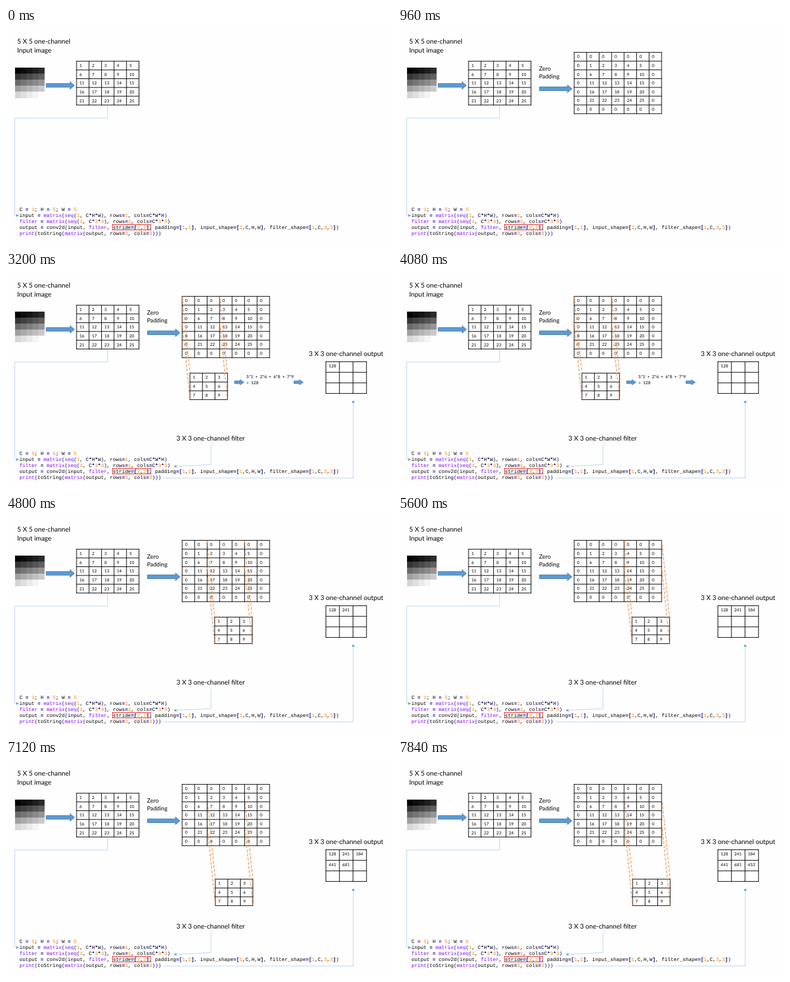
Write an HTML page that moves like this. It is 640 px wide and 360 px high and loops after 8 s.

```html
<!DOCTYPE html>
<html lang="en">
<head>
<meta charset="utf-8">
<title>Convolution with padding and stride</title>
<style>
  html, body { margin: 0; width: 100%; height: 100%; overflow: hidden; background: #fefefe; }
  svg { display: block; width: 640px; height: 360px; text-rendering: geometricPrecision; }
  text { font-family: Lato, "Open Sans", sans-serif; fill: #000; white-space: pre; }
  .title { font-size: 11px; }
  .note { font-size: 9.7px; }
  .cell { font-size: 7px; }
  .sum { font-size: 7.2px; word-spacing: 1.6px; }
  .code { font: 8.333px "Liberation Mono", monospace; }
  .num { fill: #ff8000; }
  .fn { fill: #8000ff; }
  .paren { fill: #000080; }
  .op { fill: #000080; font-weight: bold; }
  .grid { fill: none; stroke: #000; stroke-linecap: square; }
  .block { fill: #5b9bd5; stroke: #41719c; stroke-width: .8; }
  .wire { fill: none; stroke: #bdd6ee; }
  .tip { fill: #5b9bd5; }
  .rays { stroke: #ed7d31; stroke-width: 1; stroke-dasharray: 4.5 2.5; }

  .timed { animation: 8s step-end infinite; }
  .padded { animation-name: padded; }
  .filter { animation-name: filter; }
  .first { animation-name: first; }
  .sums { animation-name: sums; }
  .slide { animation-name: slide; }
  .r0 { animation-name: first; }
  .r1 { animation-name: second; }
  .r2 { animation-name: third; }
  .r3 { animation-name: fourth; }
  .r4 { animation-name: fifth; }
  .r5 { animation-name: sixth; }

  @keyframes padded { 0% { visibility: hidden } 12%, to { visibility: visible } }
  @keyframes filter { 0% { visibility: hidden } 22%, to { visibility: visible } }
  @keyframes first  { 0% { visibility: hidden } 32%, to { visibility: visible } }
  @keyframes second { 0% { visibility: hidden } 53%, to { visibility: visible } }
  @keyframes third  { 0% { visibility: hidden } 63%, to { visibility: visible } }
  @keyframes fourth { 0% { visibility: hidden } 73%, to { visibility: visible } }
  @keyframes fifth  { 0% { visibility: hidden } 83%, to { visibility: visible } }
  @keyframes sixth  { 0% { visibility: hidden } 94%, to { visibility: visible } }
  @keyframes sums {
    0%, 53%, to { visibility: hidden }
    32% { visibility: visible }
  }
  @keyframes slide {
    0% { transform: translate(0, 0) }
    53% { transform: translate(41px, 0) }
    63% { transform: translate(83px, 0) }
    73% { transform: translate(1px, 30px) }
    83% { transform: translate(42px, 30px) }
    94%, to { transform: translate(84px, 30px) }
  }
</style>
</head>
<body>
<svg viewBox="0 0 640 360">
  <text class="title" x="18.5" y="26">5 X 5 one-channel</text>
  <text class="title" x="18.5" y="40.5">Input image</text>
  <g id="image" shape-rendering="crispEdges"></g>
  <g id="input"></g>
  <path class="wire" d="M168.5 129V150H14.5V312.5H18"/>
  <path class="tip" d="M21.5 312.5l-4.5-2.2v4.4z"/>
  <g id="code"></g>
  <rect x="176.5" y="327.5" width="63.5" height="9" fill="none" stroke="#e8262a"/>

  <g class="timed padded">
    <text class="note" x="233.7" y="71">Zero</text>
    <text class="note" x="233.7" y="84">Padding</text>
    <g id="padded"></g>
  </g>

  <g class="timed filter">
    <text class="title" x="282.5" y="281">3 X 3 one-channel filter</text>
    <path class="wire" d="M339.8 288V321L281 324"/>
    <path class="tip" d="M277.8 324.2l4.6-2.5l.2 4.4z"/>
    <g id="filter" class="timed slide"></g>
  </g>

  <g class="timed first">
    <text class="title" x="502" y="139.5">3 X 3 one-channel output</text>
    <path class="wire" d="M261 343.3H575.7V217"/>
    <path class="tip" d="M575.7 213.5l-2.4 4.6h4.8z"/>
    <g id="output"></g>
  </g>

  <g id="sums" class="timed sums">
    <text class="sum" x="398.5" y="177">5*1 + 2*6 + 6*8 + 7*9</text>
    <text class="sum" x="398.5" y="186.7">= 128</text>
  </g>
</svg>
<script>
  const get = id => document.getElementById(id);

  function add(parent, tag, attrs, text = '') {
    const el = document.createElementNS('http://www.w3.org/2000/svg', tag);
    for (const key in attrs) el.setAttribute(key, attrs[key]);
    el.textContent = text;
    parent.append(el);
    return el;
  }

  // Ruled table; value(row, col) gives the text and style(row, col) an extra class.
  function table(parent, { x, y, n, w, h, value, style = () => '' }) {
    let d = '';
    for (let i = 0; i <= n; i++) {
      d += `M${x + i * w} ${y}v${n * h}M${x} ${y + i * h}h${n * w}`;
    }
    add(parent, 'path', { class: 'grid', d });
    for (let r = 0; r < n; r++) {
      for (let c = 0; c < n; c++) {
        add(parent, 'text', {
          class: 'cell ' + style(r, c), x: x + c * w + 4.7, y: y + r * h + 9.8
        }, value(r, c));
      }
    }
  }

  function blockArrow(parent, x, y, length, head, body, wing) {
    const neck = x + length - head;
    add(parent, 'path', {
      class: 'block',
      d: `M${x} ${y - body}H${neck}V${y - wing}L${x + length} ${y}L${neck} ${y + wing}V${y + body}H${x}z`
    });
  }

  const pixel = (r, c) => r * 5 + c + 1;
  const inside = i => i > 0 && i < 6;

  for (let r = 0; r < 5; r++) {
    for (let c = 0; c < 5; c++) {
      const g = Math.round((pixel(r, c) - 1) * 255 / 24);
      add(get('image'), 'rect', {
        x: 14.5 + c * 9.9, y: 66 + r * 10.1, width: 10, height: 10.2, fill: `rgb(${g},${g},${g})`
      });
    }
  }

  table(get('input'), { x: 117, y: 55.3, n: 5, w: 20.7, h: 14.6, value: pixel });
  blockArrow(get('input'), 66.5, 95.7, 47.2, 7.5, 3.1, 6.3);

  table(get('padded'), {
    x: 292.1, y: 40.6, n: 7, w: 20.7, h: 14.6,
    value: (r, c) => inside(r) && inside(c) ? pixel(r - 1, c - 1) : 0
  });
  blockArrow(get('padded'), 234.5, 101.3, 54, 7.5, 3.2, 6.4);

  table(get('filter'), {
    x: 305, y: 168.6, n: 3, w: 20.75, h: 14.7, value: (r, c) => r * 3 + c + 1
  });
  // Rays join the corners of the covered window to those of the filter.
  const rays = add(get('filter'), 'g', { class: 'rays timed first' });
  for (const x of [292.1, 354.2]) {
    for (const y of [40.6, 84.4]) {
      add(rays, 'line', { x1: x, y1: y, x2: x + 13, y2: y + 128.2 });
    }
  }

  const results = [128, 241, 184, 441, 681, 453];
  table(get('output'), {
    x: 530.4, y: 149.6, n: 3, w: 22.45, h: 17.6,
    value: (r, c) => results[r * 3 + c] ?? '',
    style: (r, c) => `timed r${r * 3 + c}`
  });

  for (const x of [379, 477.5]) blockArrow(get('sums'), x, 183.8, 15.5, 6.5, 2.2, 4.2);

  const lines = [
    'C = 1; H = 5; W = 5',
    'input = matrix(seq(1, C*H*W), rows=1, cols=C*W*H)',
    'filter = matrix(seq(1, C*3*3), rows=1, cols=C*3*3)',
    'output = conv2d(input, filter, stride=[2,2], padding=[1,1], input_shape=[1,C,H,W], filter_shape=[1,C,3,3])',
    'print(toString(matrix(output, rows=3, cols=3)))'
  ];
  const token = /(?<num>\b\d+\b)|(?<fn>\b(?:matrix|seq|filter|print)\b)|(?<paren>[()]+)|(?<op>[=*[\]]+)/g;
  lines.forEach((line, i) => {
    const row = add(get('code'), 'text', { class: 'code', x: 22.2, y: 304.8 + i * 10.1 });
    let end = 0;
    for (const m of line.matchAll(token)) {
      row.append(line.slice(end, m.index));
      const kind = Object.keys(m.groups).find(key => m.groups[key]);
      add(row, 'tspan', { class: kind }, m[0]);
      end = m.index + m[0].length;
    }
    row.append(line.slice(end));
  });
</script>
</body>
</html>
```
